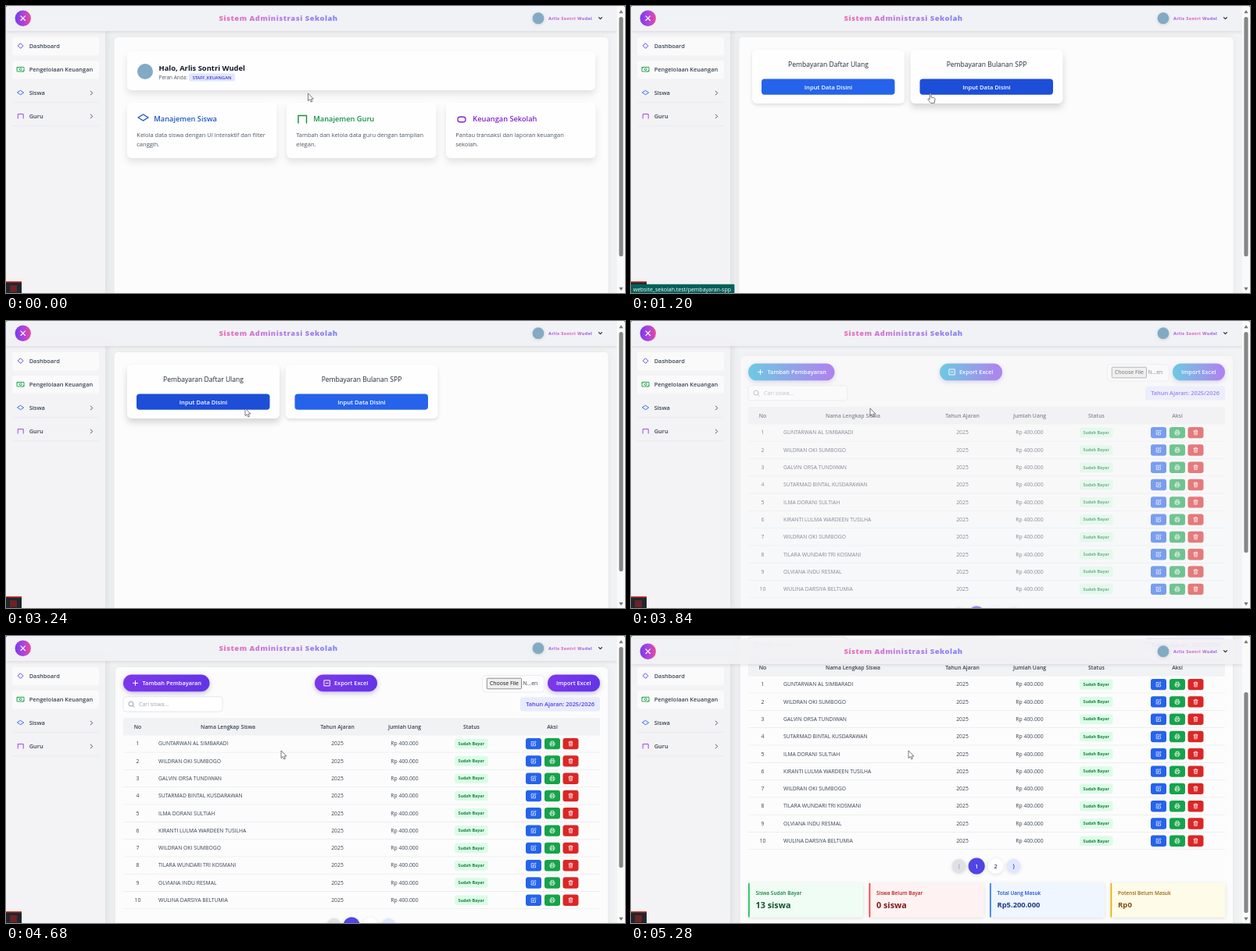
Animation, 792 px wide and 368 px high, one loop 5.4 s. Source, as an HTML page:

```html
<!DOCTYPE html>
<html lang="id">
<head>
<meta charset="utf-8">
<title>Sistem Administrasi Sekolah</title>
<style>
html, body { margin: 0; width: 100%; height: 100%; overflow: hidden; background: #0b8584; }
svg { display: block; }
text { font-family: "Open Sans", "Noto Sans", sans-serif; white-space: pre; }
.panel { filter: drop-shadow(0 0 5px rgba(0,0,0,.06)); }
.card { filter: drop-shadow(0 5px 4px rgba(0,0,0,.1)); }
.soft { filter: drop-shadow(0 1px 2px rgba(0,0,0,.12)); }
.low { filter: drop-shadow(0 2px 2px rgba(0,0,0,.12)); }
.lift { filter: drop-shadow(0 5px 4px rgba(0,0,0,.16)); }
.pill { filter: drop-shadow(0 2px 3px rgba(60,40,150,.3)); }
</style>
</head>
<body>
<svg id="stage" width="792" height="368" viewBox="0 0 792 368"></svg>
<script>
const LOOP = 5400, STEP = 120;
const USER = 'Arlis Sontri Wudel';
const HOST = 'website_sekolah.test/';
const STUDENTS = [
  'GUNTARWAN AL SIMBARADI', 'WILDRAN OKI SUMBOGO', 'GALVIN ORSA TUNDIWAN',
  'SUTARMAD BINTAL KUSDARAWAN', 'ILMA DORANI SULTIAH', 'KIRANTI LULMA WARDEEN TUSILHA',
  'WILDRAN OKI SUMBOGO', 'TILARA WUNDARI TRI KOSMANI', 'OLVIANA INDU RESMAL',
  'WULINA DARSIYA BELTUMIA'
];

// Markup helpers; text is placed by its vertical centre
const rect = (x, y, w, h, fill, r = 0, more = '') =>
  `<rect x="${x}" y="${y}" width="${w}" height="${h}" fill="${fill}" rx="${r}" ${more}/>`;
const text = (x, y, s, size, fill, weight = 400, anchor = 'start', more = '') =>
  `<text x="${x}" y="${y + size * .35}" font-size="${size}" fill="${fill}" font-weight="${weight}" text-anchor="${anchor}" ${more}>${s}</text>`;
const mid = (x, y, s, size, fill, weight) => text(x, y, s, size, fill, weight, 'middle');
const line = (d, color, width = 1, x = 0, y = 0) =>
  `<path d="${d}" transform="translate(${x} ${y})" fill="none" stroke="${color}" stroke-width="${width}" stroke-linejoin="round" stroke-linecap="round"/>`;
const dot = (x, y, r, fill, more = '') => `<circle cx="${x}" cy="${y}" r="${r}" fill="${fill}" ${more}/>`;
const gradient = (id, stops, more = '') => `<linearGradient id="${id}" ${more}>` +
  stops.map((c, i) => `<stop offset="${i / (stops.length - 1)}" stop-color="${c}"/>`).join('') + '</linearGradient>';

const ICON = {
  diamond: 'M0-3.2 3.2 0 0 3.2-3.2 0Z',
  wide: 'M0-2.6 4 0 0 2.6-4 0Z',
  arch: 'M-3.5 3V-2.5H3.5V3',
  note: 'M-4.3-2.8H4.3V2.8H-4.3ZM-1.4 0A1.4 1.4 0 1 0 1.4 0 1.4 1.4 0 1 0-1.4 0M-4.3-1.2-2.7-2.8M4.3 1.2 2.7 2.8',
  chevron: 'M-1.2-2.4 1.2 0-1.2 2.4',
  edit: 'M-.3-2.5H-2.8V2.8H2.5V.3M-.9.9-.6-.6 2.2-3.2 3.2-2.2.5.6Z',
  print: 'M-1.7-1V-3H1.7V-1M-1.7 1.7H-3V-1H3V1.7H1.7M-1.7.6H1.7V3H-1.7Z',
  trash: 'M-2.6-1.9H2.6M-1-1.9V-3H1V-1.9M-2-1.9-1.7 3H1.7L2-1.9M-.6-.5V1.6M.6-.5V1.6'
};

const panel = (x, w) => rect(x, 40, w, 420, '#fcfcfc', 5, 'class="panel"');

function dashboard() {
  const cards = [
    [155, '#1e55c8', 'Manajemen Siswa', ['Kelola data siswa dengan UI interaktif dan filter', 'canggih.'], 'M0-4 6.5 0 0 4-6.5 0Z', 175.5, 143],
    [359, '#15903f', 'Manajemen Guru', ['Tambah dan kelola data guru dengan tampilan', 'elegan.'], 'M-5 5V-4.5H5.5V5', 379, 145],
    [563, '#7e22ce', 'Keuangan Sekolah', ['Pantau transaksi dan laporan keuangan', 'sekolah.'], 'M-2-3.3H2Q5-3.3 5 0T2 3.3H-2Q-5 3.3-5 0T-2-3.3Z', 583, 145.5]
  ];
  return panel(138.5, 632) +
    rect(155, 58, 599, 50, '#fefefe', 6, 'class="card"') +
    dot(178, 84, 10, '#83aac4') +
    text(195.5, 79.5, 'Halo, ' + USER, 9.4, '#111827', 700) +
    text(195.5, 91.5, 'Peran Anda:', 6.45, '#4b5563') +
    rect(234, 86.5, 59, 10, '#e0e7ff', 2) +
    mid(263.5, 91.7, 'STAFF_KEUANGAN', 5.7, '#4338ca', 600) +
    cards.map(([x, color, title, body, icon, ix, iy]) =>
      rect(x, 124, 191.5, 71, '#fefefe', 6, 'class="card"') +
      line(icon, color, 1.4, ix, iy) +
      text(x + 34.3, 145.2, title, 9.25, color, 600) +
      body.map((s, i) => text(x + 12.3, 165.5 + i * 11.6, s, 7.5, '#4b5563')).join('')
    ).join('');
}

function payments() {
  return panel(138.5, 632) + [['Pembayaran Daftar Ulang', 155], ['Pembayaran Bulanan SPP', 357.5]].map(([s, x], i) =>
    rect(x, 56, 195, 69, '#fefefe', 6, `class="low" id="card${i}"`) +
    mid(x + 97.5, 74.8, s, 8.55, '#1f2937', 500) +
    rect(x + 12, 93.5, 170.5, 20.3, '#2563eb', 4, `id="input${i}"`) +
    mid(x + 97.5, 104, 'Input Data Disini', 7.6, '#fff', 600)
  ).join('');
}

function table() {
  const pill = (x, w, label, tx) =>
    rect(x, 49.5, w, 21.8, 'url(#flow)', 10.9, 'class="pill"') + text(tx, 60.6, label, 7.4, '#fff', 600);
  const heads = [['No', 168.5], ['Nama Lengkap Siswa', 284], ['Tahun Ajaran', 424], ['Jumlah Uang', 510], ['Status', 595.5], ['Aksi', 699]];
  const actions = [[665, '#2563eb', 'edit'], [689, '#16a34a', 'print'], [712.5, '#dc2626', 'trash']];
  const stats = [
    ['Siswa Sudah Bayar', '13 siswa', 10.8, '#22c55e', '#f0fdf4', '#15803d', '#14532d'],
    ['Siswa Belum Bayar', '0 siswa', 10.8, '#ef4444', '#fef2f2', '#b91c1c', '#7f1d1d'],
    ['Total Uang Masuk', 'Rp5.200.000', 9.4, '#3b82f6', '#eff6ff', '#1d4ed8', '#1e3a8a'],
    ['Potensi Belum Masuk', 'Rp0', 9.6, '#eab308', '#fefce8', '#a16207', '#854d0e']
  ];
  const rows = STUDENTS.map((name, i) => {
    const y = 138 + i * 22.3;
    return rect(150, y + 10.8, 610, .6, '#e5e7eb') +
      mid(168.5, y, i + 1, 6.8, '#374151') +
      text(195, y, name, 6.8, '#374151') +
      mid(424, y, '2025', 6.8, '#374151') +
      mid(510, y, 'Rp 400.000', 6.8, '#374151') +
      rect(574, y - 6.2, 42.5, 12.6, '#dcfce7', 2.5) +
      mid(595.2, y, 'Sudah Bayar', 5.35, '#15803d', 700) +
      actions.map(([x, c, icon]) =>
        rect(x, y - 7.1, 20, 14.4, c, 3) + line(ICON[icon], '#fff', .7, x + 10, y)).join('');
  }).join('');
  const pages = [[419.5, 9, '#dfe1e6', '⟨', '#9ca3af'], [442.2, 10.6, '#4f46e5', '1', '#fff'],
    [466.5, 10, '#fff', '2', '#374151'], [489.5, 9, '#e0e7ff', '⟩', '#4338ca']];
  return panel(140, 630) +
    pill(150, 110.5, 'Tambah Pembayaran', 174.5) + line('M-3 0H3M0-3V3', '#fff', 1, 165.5, 60.4) +
    pill(395, 80, 'Export Excel', 420) + line('M-3.5-3.5H3.5V3.5H-3.5ZM-1.5 0H1.5', '#fff', 1, 410.8, 60.4) +
    pill(693, 67, 'Import Excel', 704) +
    rect(609.5, 50.5, 79, 21.5, '#fdfdfe', 4, 'stroke="#e2e4e8" stroke-width=".7"') +
    rect(615.3, 54.2, 44.2, 13.6, '#efefef', 1, 'stroke="#777" stroke-width=".8"') +
    mid(637.4, 61, 'Choose File', 6.95, '#111') + text(661.5, 61, 'N...en', 6.9, '#374151') +
    rect(150, 77.8, 127, 19.2, '#fff', 4, 'stroke="#d8dbe0" stroke-width=".7"') +
    line('M3 0A3 3 0 1 0-3 0 3 3 0 1 0 3 0M2.2 2.2 4.3 4.3', '#9ca3af', 1, 160, 87) +
    text(170, 87.4, 'Cari siswa...', 7, '#9ca3af') +
    rect(658, 78.5, 102, 18, '#e9ebff', 3) +
    mid(709, 87.6, 'Tahun Ajaran: 2025/2026', 7.4, '#4f3fdc', 600) +
    rect(150, 105, 610, 22.5, '#f1f2f4') +
    heads.map(([s, x]) => mid(x, 116.5, s, 6.85, '#374151', 600)).join('') +
    rows +
    pages.map(([x, r, bg, s, c]) => dot(x, 371, r, bg, 'class="soft"') + mid(x, 371.3, s, 7, c, 600)).join('') +
    stats.map(([label, value, size, edge, bg, c1, c2], i) => {
      const x = 150 + i * 154.5;
      return rect(x, 392.7, 147, 44, bg, 2, 'class="soft"') + rect(x, 392.7, 1.8, 44, edge, .9) +
        text(x + 9.5, 405.7, label, 6.5, c1, 600) + text(x + 9.5, 420.8, value, size, c2, 700);
    }).join('');
}

function sidebar() {
  const items = [['Dashboard', 51.6, 'diamond', '#5b34d6'], ['Pengelolaan Keuangan', 81.6, 'note', '#16a34a'],
    ['Siswa', 111.5, 'wide', '#2563eb'], ['Guru', 141.5, 'arch', '#9333ea']];
  return rect(0, 30, 127, 340, '#f3f3f5', 0, 'style="filter:drop-shadow(3px 0 5px rgba(0,0,0,.09))"') +
    items.map(([label, y, icon, color], i) =>
      (i < 2 ? rect(8, y - 11.5, 111, 23.3, '#fafafb', 3) : rect(8, y + 12, 111, .7, '#e3e5e9') +
        line(ICON.chevron, '#374151', .9, 109.5, y)) +
      line(ICON[icon], color, .9, 18.7, y - .4) +
      text(29.7, y + .3, label, 7.4, '#374151', 600)
    ).join('');
}

function header() {
  return rect(0, 0, 782, 32, '#f4f4f7', 0, 'fill-opacity=".92" class="soft"') +
    dot(21.7, 15.7, 10.2, 'url(#close)') + line('M-2.8-2.8 2.8 2.8M2.8-2.8-2.8 2.8', '#fff', 1.1, 21.7, 15.7) +
    text(272.5, 15.8, 'Sistem Administrasi Sekolah', 9.4, 'url(#title)', 800, 'start', 'letter-spacing=".52"') +
    dot(681, 15.7, 7.4, '#83aac4', 'class="soft"') +
    text(694, 15.7, USER, 5.3, 'url(#user)', 800, 'start', 'letter-spacing=".38"') +
    line('M-2-1 0 1 2-1', '#222', 1.1, 760.5, 15.7);
}

const scrollbar = rect(782, 0, 10, 368, '#fafafa') +
  '<path d="M784.3 9.3H789.7L787 5.2ZM784.3 360.8H789.7L787 364.9Z" fill="#777"/>' +
  rect(784.4, 14, 5.2, 307, '#868686', 2.6, 'id="thumb"');

const badge = rect(0, 353, 20, 15, '#1f262e') + rect(0, 353, 20, 1.5, '#d8392b') + rect(5, 358, 9, 9, '#6b2326');

const stage = document.getElementById('stage');
stage.innerHTML = '<defs>' +
  gradient('flow', ['#06b6d4', '#7c38eb', '#6235e6']) +
  gradient('close', ['#7c3aed', '#a845e0', '#ec4899']) +
  gradient('title', ['#ee6db4', '#b97be8', '#7f83f8'], 'gradientUnits="userSpaceOnUse" x1="272" x2="426"') +
  gradient('user', ['#b06be8', '#e070c0', '#8a76f0'], 'gradientUnits="userSpaceOnUse" x1="694" x2="753"') +
  '<clipPath id="window"><path d="M0 368V3Q0 0 3 0H789Q792 0 792 3V368Z"/></clipPath></defs>' +
  '<g clip-path="url(#window)">' + rect(0, 0, 792, 368, '#f2f3f5') +
  `<g id="dash">${dashboard()}</g><g id="pay">${payments()}</g><g id="list">${table()}</g>` +
  sidebar() + `<g id="bar">${header()}</g>` + scrollbar + badge +
  `<g id="status">${rect(0, 356.7, 133, 12, '#04605a', 1, 'id="statusBox"')}${text(2.7, 363.3, '', 7, '#fff', 400, 'start', 'id="statusText"')}</g></g>` +
  '<g id="cursor" fill="#fff" stroke="#444" stroke-width=".7" stroke-linejoin="round">' +
  '<path id="arrow" d="M0 0V9.6L2.3 7.6 3.8 11 5.4 10.3 3.9 7.1H6.9Z"/>' +
  '<path id="hand" d="M-.8 1C-.8-.3 1-.3 1 1V5L4.8 5.8Q6.3 6.2 6 7.8L5.2 12.4H.5L-2.8 8.5C-3.6 7.4-2.4 6.5-1.6 7.2L-.8 8Z"/></g>';

const el = Object.fromEntries([...stage.querySelectorAll('[id]')].map(e => [e.id, e]));
const show = (e, on) => e.style.display = on ? '' : 'none';
const clamp = v => Math.max(0, Math.min(1, v));

// Cursor stops: time, x, y
const PATH = [[0, 386.5, 112], [600, 75, 84], [720, 75, 84], [1200, 383, 112], [1680, 306, 112],
  [4200, 306, 112], [4680, 352, 147], [5040, 353, 147], [5280, 355, 147], [LOOP, 355, 147]];

function cursorAt(t) {
  const i = PATH.findIndex(p => p[0] > t), a = PATH[i - 1], b = PATH[i];
  const k = (t - a[0]) / (b[0] - a[0]);
  return [a[1] + (b[1] - a[1]) * k, a[2] + (b[2] - a[2]) * k];
}

// Page entrance: fade in while rising
function enter(e, t, start, length, scroll = 0) {
  const k = (1 - clamp((t - start) / length)) ** 1.5;
  e.setAttribute('opacity', 1 - .76 * k);
  e.setAttribute('transform', `translate(0 ${9.3 * k - scroll})`);
}

function draw(t) {
  const page = t < 840 ? 'dash' : t < 3600 ? 'pay' : 'list';
  for (const id of ['dash', 'pay', 'list']) show(el[id], id === page);
  const scroll = 76 * clamp((t - 5040) / 240);
  enter(el.pay, t, 720, 480);
  enter(el.list, t, 3600, 720, scroll);
  // The sticky header rests slightly lower once the page scrolls
  el.bar.setAttribute('transform', `translate(0 ${Math.min(scroll, 4)})`);

  const shift = Math.sin(Math.PI / 2 * clamp((t - 3800) / 1000));
  el.flow.setAttribute('x1', -shift);
  el.flow.setAttribute('x2', 2 - shift);

  const [x, y] = cursorAt(t);
  const over = page !== 'pay' || y < 93.5 || y > 114 ? -1 : x > 167 && x < 338 ? 0 : x > 369 && x < 540 ? 1 : -1;
  for (const i of [0, 1]) {
    el['input' + i].setAttribute('fill', over === i ? '#1d4ed8' : '#2563eb');
    el['card' + i].setAttribute('class', over === i ? 'lift' : 'low');
  }

  const link = x < 119 ? 'pengelolaan-keuangan' :
    over >= 0 && t < 2880 ? ['pembayaran-daftar-ulang', 'pembayaran-spp'][over] : '';
  show(el.status, link);
  show(el.hand, link);
  show(el.arrow, !link);
  if (link) {
    el.statusText.textContent = HOST + link;
    el.statusBox.setAttribute('width', el.statusText.getComputedTextLength() + 7);
  }
  el.cursor.setAttribute('transform', `translate(${x} ${y})`);

  el.thumb.setAttribute('y', 14 + scroll * 58 / 76);
  el.thumb.setAttribute('height', page === 'list' ? 283 : 307);
}

const began = performance.now();
function tick() {
  const t = (performance.now() - began) % LOOP;
  draw(Math.floor(t / STEP) * STEP);
  requestAnimationFrame(tick);
}
tick();
</script>
</body>
</html>
```
